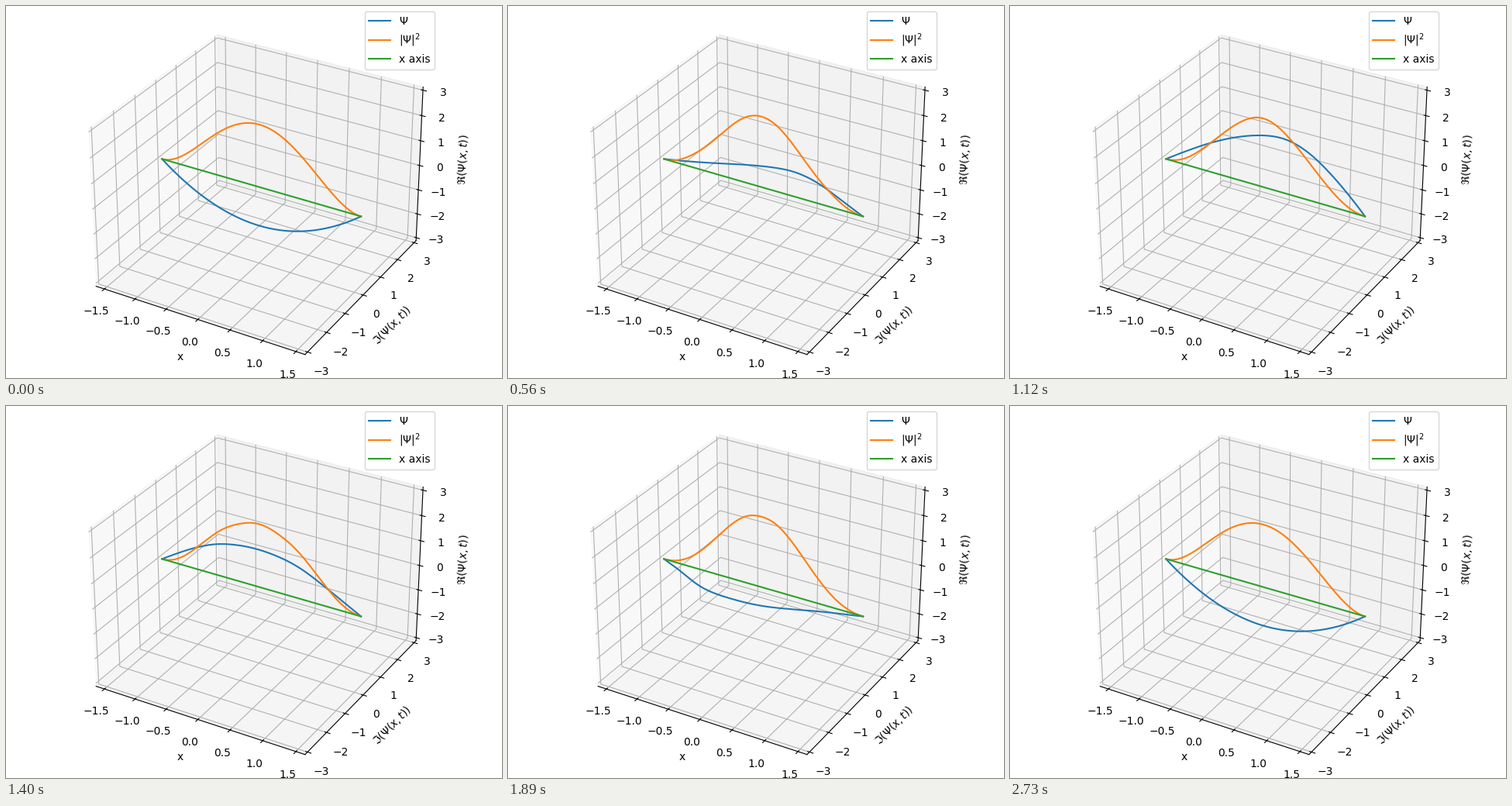
These frames come from a looping animation (640 by 480 pixels, 2.8 s). A matplotlib script:

```python
import numpy as np
import matplotlib.pyplot as plt
from matplotlib.animation import FuncAnimation

FRAMES = 40
INTERVAL = 70
HALF = np.pi / 2          # half width of the well
MARGIN = 25 / 24          # padding of the view around the data limits

x = np.linspace(-HALF, HALF, 300)
zero = np.zeros_like(x)

# Cosine series of the parabola -HALF * (1 - (x / HALF)**2)
n = np.arange(1, 60, 2)
coeffs = -16 / np.pi**2 * (-1.0) ** ((n - 1) // 2) / n**3
modes = coeffs[:, None] * np.cos(np.outer(n, x))


def wave(t):
    """Particle in a box: each mode turns with energy n^2."""
    return np.exp(-1j * n**2 * t) @ modes


fig = plt.figure(figsize=(6.4, 4.8), dpi=100)
ax = fig.add_axes((0, 0, 1, 1), projection="3d")

psi_line, = ax.plot(x, zero, zero, label=r"$\Psi$")
prob_line, = ax.plot(x, zero, zero, label=r"$|\Psi|^2$")
ax.plot(x, zero, zero, label="x axis")

ax.set_xlim(-HALF * MARGIN, HALF * MARGIN)
ax.set_ylim(-3 * MARGIN, 3 * MARGIN)
ax.set_zlim(-3 * MARGIN, 3 * MARGIN)
ax.set_xlabel("x")
ax.set_ylabel(r"$\Im(\Psi(x,t))$")
ax.set_zlabel(r"$\Re(\Psi(x,t))$")
ax.legend(loc="upper right")


def update(k):
    psi = wave(2 * np.pi * k / (FRAMES - 1))
    psi_line.set_data_3d(x, psi.imag, psi.real)
    prob_line.set_data_3d(x, zero, np.abs(psi) ** 2)
    return psi_line, prob_line


anim = FuncAnimation(fig, update, frames=FRAMES, interval=INTERVAL, repeat=True)
plt.show()
```
